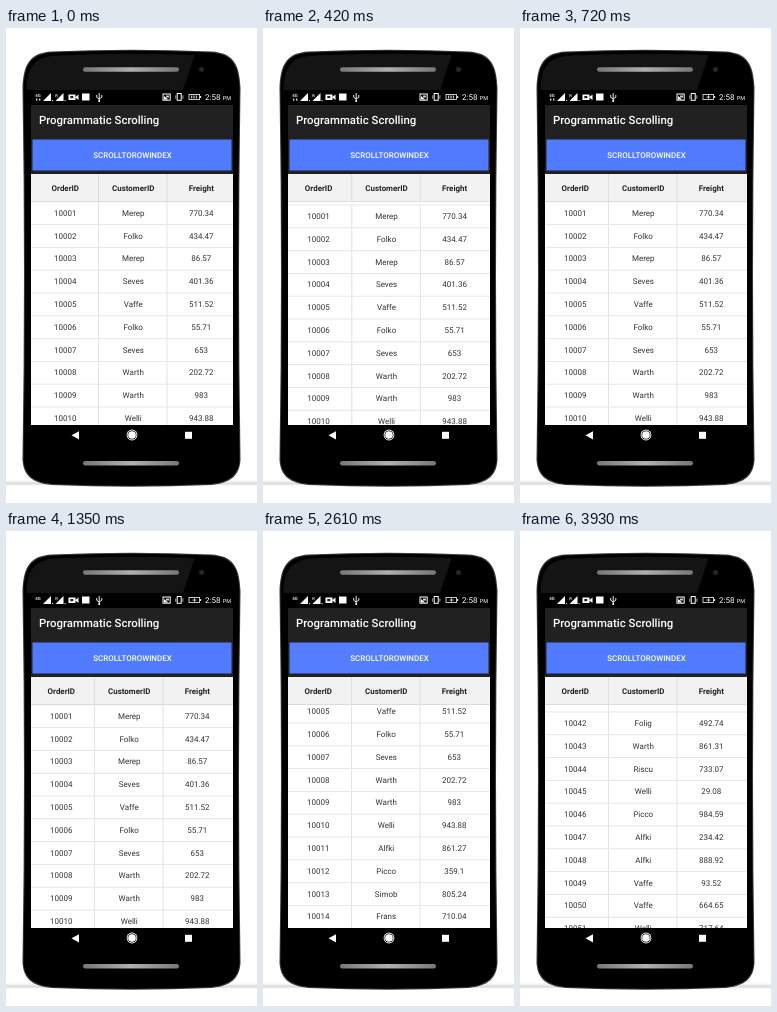
An HTML page with a canvas that plays this animation: 251x475 px, repeating every 3.96 s.

```html
<!DOCTYPE html>
<html lang="en">
<head>
<meta charset="utf-8">
<title>Programmatic Scrolling</title>
<style>
  html, body { margin: 0; width: 100%; height: 100%; overflow: hidden; background: #fff; }
  canvas { display: block; width: 251px; height: 475px; }
</style>
</head>
<body>
<canvas id="stage"></canvas>
<script>
const W = 251, H = 475, LOOP = 3960, TICK = 30;
const ROW_H = 22.8, TOP = 174, BOTTOM = 397, LEFT = 25, RIGHT = 227;
const COLS = [55.3, 123.2, 191.3];
const FONT = 'Roboto, "Open Sans", sans-serif';

const parse = (first, text) => text.split(', ').map((pair, i) => [first + i, ...pair.split(' ')]);
const rows = [
  ...parse(10001, 'Merep 770.34, Folko 434.47, Merep 86.57, Seves 401.36, Vaffe 511.52, Folko 55.71, ' +
    'Seves 653, Warth 202.72, Warth 983, Welli 943.88, Alfki 861.27, Picco 359.1, Simob 805.24, ' +
    'Frans 710.04, Folig 318.45'),
  ...parse(10042, 'Folig 492.74, Warth 861.31, Riscu 733.07, Welli 29.08, Picco 984.59, Alfki 234.42, ' +
    'Alfki 888.92, Vaffe 93.52, Vaffe 664.65, Welli 717.64')
];

const canvas = document.getElementById('stage');
const ctx = canvas.getContext('2d');
const dpr = window.devicePixelRatio || 1;
canvas.width = Math.round(W * dpr);
canvas.height = Math.round(H * dpr);
ctx.textRendering = 'geometricPrecision';

const clamp = v => Math.max(0, Math.min(1, v));
const smooth = p => p * p * (3 - 2 * p);
const inOut = p => p < 0.5 ? 4 * p ** 3 : 1 - 4 * (1 - p) ** 3;
const span = (t, a, b) => clamp((t - a) / (b - a));

// Eased interpolation through [time, value] pairs
function track(t, keys) {
  for (let i = 1; i < keys.length; i++) {
    const [t0, v0] = keys[i - 1], [t1, v1] = keys[i];
    if (t <= t1) return v0 + (v1 - v0) * smooth(span(t, t0, t1));
  }
  return keys[keys.length - 1][1];
}

function scrollY(t) {
  if (t >= 3930) return 927.6;
  if (t >= 2190) return 95.8 * inOut(span(t, 2190, 2610));
  return track(t, [[0, 0], [30, 0], [210, 14.3], [270, 16], [540, -17], [570, -17], [720, 0]]);
}
const shiftX = t => t >= 3930 ? 0 : track(t, [[0, 4], [270, 4], [450, 0]]);

function rect(x, y, w, h, fill) {
  ctx.fillStyle = fill;
  ctx.fillRect(x, y, w, h);
}
function round(x, y, w, h, r, fill) {
  ctx.beginPath();
  ctx.roundRect(x, y, w, h, r);
  ctx.fillStyle = fill;
  ctx.fill();
}
function disc(x, y, r, fill) {
  ctx.beginPath();
  ctx.arc(x, y, r, 0, Math.PI * 2);
  ctx.fillStyle = fill;
  ctx.fill();
}
function poly(points, fill) {
  ctx.beginPath();
  points.forEach(([x, y]) => ctx.lineTo(x, y));
  ctx.closePath();
  ctx.fillStyle = fill;
  ctx.fill();
}
function frame(x, y, w, h, stroke = '#fff', width = 1) {
  ctx.strokeStyle = stroke;
  ctx.lineWidth = width;
  ctx.strokeRect(x, y, w, h);
}
function label(str, x, y, size, weight, fill, align = 'center') {
  ctx.font = `${weight} ${size}px ${FONT}`;
  ctx.textAlign = align;
  ctx.textBaseline = 'alphabetic';
  ctx.fillStyle = fill;
  ctx.fillText(str, x, y);
}

function bodyPath(inset) {
  const l = 16.5 + inset, r = 234.5 - inset, t = 23.5 + inset, b = 457 - inset;
  ctx.beginPath();
  ctx.moveTo(l, 60);
  ctx.bezierCurveTo(l + 1, t + 10, l + 9, t + 1.5, l + 29, t);
  ctx.quadraticCurveTo(125.5, t - 3.5, r - 29, t);
  ctx.bezierCurveTo(r - 9, t + 1.5, r - 1, t + 10, r, 60);
  ctx.quadraticCurveTo(r - 3, 245, r, 432);
  ctx.bezierCurveTo(r - 1, b - 10, r - 9, b - 2, r - 29, b);
  ctx.quadraticCurveTo(125.5, b + 3.5, l + 29, b);
  ctx.bezierCurveTo(l + 9, b - 2, l + 1, b - 10, l, 432);
  ctx.quadraticCurveTo(l + 3, 245, l, 60);
  ctx.closePath();
}

function speaker(y) {
  const g = ctx.createLinearGradient(77, 0, 173, 0);
  g.addColorStop(0, '#777');
  g.addColorStop(0.5, '#b4b0ac');
  g.addColorStop(1, '#777');
  round(77, y, 96, 4.5, 2.2, g);
}

function floorShadow(x, w) {
  const g = ctx.createLinearGradient(0, 452, 0, 458);
  g.addColorStop(0, 'rgba(0,0,0,0)');
  g.addColorStop(0.6, 'rgba(0,0,0,0.14)');
  g.addColorStop(1, 'rgba(0,0,0,0)');
  rect(x, 452, w, 6, g);
}

function phone() {
  floorShadow(0, 40);
  floorShadow(211, 40);
  bodyPath(0);
  ctx.fillStyle = '#3a3a3a';
  ctx.fill();
  bodyPath(1);
  ctx.fillStyle = '#000';
  ctx.fill();
  // Reflection on the upper bezel
  ctx.save();
  bodyPath(4);
  ctx.clip();
  poly([[20, 20], [191, 20], [177, 62], [20, 62]], '#141414');
  ctx.restore();
  speaker(39.3);
  speaker(433);
  disc(195.5, 41.5, 2.8, '#1c1c1c');
  disc(195.5, 41.5, 1.4, '#2a2f38');
}

function battery(charging) {
  frame(183, 66.5, 10.5, 5, '#ddd', 0.9);
  rect(194, 68, 1.2, 2, '#ddd');
  if (charging) {
    for (let x = 185; x < 192; x += 2.4) rect(x, 67.5, 1.3, 3, '#bbb');
  } else {
    rect(186.5, 68.6, 4, 0.9, '#ddd');
    rect(188, 67.3, 0.9, 3.4, '#ddd');
  }
}

function signal(x) {
  poly([[x, 73], [x + 8, 73], [x + 8, 65]], '#fff');
  rect(x + 9, 72, 1.2, 1.2, '#ccc');
}

function statusBar(t) {
  rect(LEFT, 62, 202, 15, '#000');
  label('4G', 32, 69.3, 4.4, 500, '#fff');
  if (t < 1350) {
    rect(30, 70.5, 1.4, 2.2, '#ccc');
    rect(33, 70.5, 1.4, 2.2, '#ccc');
  }
  signal(37);
  signal(49.5);
  label('R', 50.5, 68.5, 4, 500, '#fff');
  rect(62.5, 66.5, 7, 5.5, '#fff');
  poly([[69, 69.2], [72.5, 66.5], [72.5, 72]], '#fff');
  rect(64.3, 68, 3, 2.2, '#222');
  rect(76, 65.5, 7.5, 7, '#fff');

  ctx.strokeStyle = '#fff';
  ctx.lineWidth = 0.9;
  ctx.beginPath();
  ctx.moveTo(93.2, 65);
  ctx.lineTo(93.2, 73.5);
  ctx.moveTo(90.7, 67);
  ctx.lineTo(90.7, 69.3);
  ctx.lineTo(93.2, 71);
  ctx.lineTo(95.8, 69.3);
  ctx.lineTo(95.8, 67);
  ctx.stroke();
  disc(93.2, 73, 1, '#fff');

  frame(157, 66, 7.2, 6.2);
  poly([[158, 71.5], [158, 68], [162.3, 71.5]], '#fff');
  rect(160, 67.5, 3, 2, '#ccc');
  frame(171.2, 65.5, 4, 6.8);
  rect(169.4, 67.3, 0.8, 3.5, '#ccc');
  rect(176.5, 67.3, 0.8, 3.5, '#ccc');
  battery(t < 660 || (t >= 3060 && t < 3690));
  label('2:58', 199, 72.3, 8, 400, '#fff', 'left');
  label('PM', 225, 72.3, 5.5, 400, '#fff', 'right');
}

function button(t) {
  const box = [26.5, 111.5, 199, 31];
  rect(...box, '#507aff');
  if (t >= 1710 && t < 2730) {
    const fade = 1 - span(t, 2220, 2730);
    ctx.save();
    ctx.beginPath();
    ctx.rect(...box);
    ctx.clip();
    rect(...box, `rgba(255,255,255,${0.025 * fade * span(t, 1680, 1830)})`);
    const r = 5 + 6 * span(t, 1710, 1980) + 130 * smooth(span(t, 2010, 2400));
    disc(147, 124.5, r, `rgba(255,255,255,${0.09 * fade})`);
    ctx.restore();
  }
  label('SCROLLTOROWINDEX', 126.5, 130, 7.95, 500, '#fff');
}

function grid(t) {
  const dx = shiftX(t), sy = scrollY(t);
  const lines = [88.5 + dx, 157 + dx];

  rect(LEFT, TOP, 202, BOTTOM - TOP, '#fff');
  ctx.save();
  ctx.beginPath();
  ctx.rect(LEFT, TOP, 202, BOTTOM - TOP);
  ctx.clip();
  const start = Math.max(TOP, TOP - sy);
  lines.forEach(x => rect(x - 0.5, start, 1, BOTTOM - start, '#e2e2e2'));
  for (let y = TOP - sy % ROW_H; y < BOTTOM; y += ROW_H) rect(LEFT, y - 0.7, 202, 1, '#e6e6e6');
  for (const row of rows) {
    const y = 185 + (row[0] - 10001) * ROW_H - sy;
    if (y < TOP - 10 || y > BOTTOM + 10) continue;
    row.forEach((cell, i) => label(cell, COLS[i] + dx, y + 2.8, 8, 400, '#333'));
  }
  ctx.restore();

  rect(LEFT, 146, 202, 28, '#f2f2f2');
  lines.forEach(x => rect(x - 0.5, 146, 1, 28, '#dedede'));
  rect(LEFT, 173, 202, 1, '#dcdcdc');
  ['OrderID', 'CustomerID', 'Freight'].forEach((name, i) =>
    label(name, COLS[i] + dx, 162.8, 7.95, 700, '#222'));
}

function navBar() {
  rect(LEFT, BOTTOM, 202, 21, '#000');
  poly([[65.5, 407.3], [73, 403.2], [73, 411.4]], '#fff');
  disc(126, 407, 5.4, '#fff');
  disc(126, 407, 4.5, '#000');
  disc(126, 407, 3.8, '#fff');
  rect(179, 403.8, 7, 7, '#fff');
}

function draw(t) {
  ctx.setTransform(dpr, 0, 0, dpr, 0, 0);
  rect(0, 0, W, H, '#fff');
  phone();
  rect(LEFT, 77, RIGHT - LEFT, 69, '#212121');
  statusBar(t);
  label('Programmatic Scrolling', 33, 96.3, 11.4, 500, '#fff', 'left');
  button(t);
  grid(t);
  navBar();
}

const begin = performance.now();
function loop() {
  const t = (performance.now() - begin) % LOOP;
  draw(Math.floor(t / TICK) * TICK);
  requestAnimationFrame(loop);
}
loop();
</script>
</body>
</html>
```
